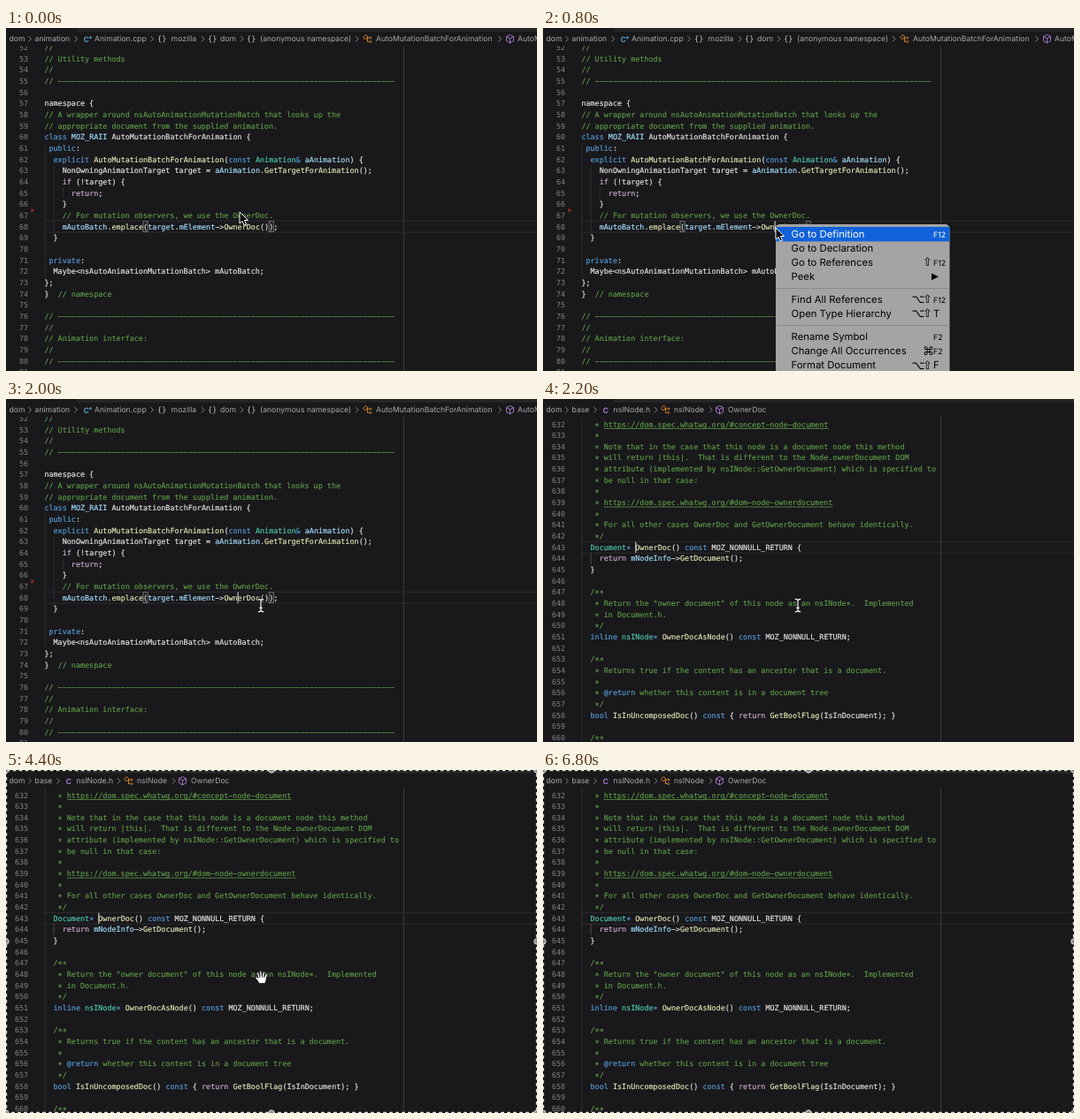
These frames come from a looping animation (600x388 px, 7200 ms). An HTML page:

```html
<!DOCTYPE html>
<html lang="en">
<head>
<meta charset="utf-8">
<title>Go to definition</title>
<style>
  html, body { margin: 0; width: 100%; height: 100%; overflow: hidden; background: #19181b; }
  svg { display: block; width: 600px; height: 388px; }
  text { white-space: pre; text-rendering: geometricPrecision; }
  .code text { font: 8.43px "DejaVu Sans Mono", monospace; stroke-width: .16px; }
  .crumbs text { font: 8.65px Inter, sans-serif; fill: #a9a9a9; }
  .crumbs .brace { font: 8.6px "DejaVu Sans Mono", monospace; fill: #c4c4c4; }
  .menu text { font: 11.3px Inter, sans-serif; }
  .menu .symbol { font: 13px "DejaVu Sans", sans-serif; }
  .menu .fkey { font-size: 8.8px; }
</style>
</head>
<body>
<svg id="stage" viewBox="0 0 600 388">
  <defs><clipPath id="editor"><rect y="20.5" width="600" height="368"/></clipPath></defs>
  <rect width="600" height="388" fill="#19181b"/>
  <rect x="80" width="520" height="4" fill="#252526"/>
</svg>
<script>
const LOOP = 7200, STEP = 200;
const CHAR = 5.075, ROW = 12.66, LEFT = 43.4;
const COLORS = {
  c: '#5c9a46', u: '#5c9a46', k: '#569cd6', t: '#4ec9b0',
  f: '#e6e6b4', v: '#a4e0ff', r: '#cfaed2', p: '#e6e6e6'
};
const stage = document.getElementById('stage');

function add(parent, tag, attrs = {}, content) {
  const node = document.createElementNS('http://www.w3.org/2000/svg', tag);
  for (const key in attrs) node.setAttribute(key, attrs[key]);
  if (content !== undefined) node.textContent = content;
  return parent.appendChild(node);
}
const group = (parent, attrs) => add(parent, 'g', attrs);
const path = (parent, d, attrs) => add(parent, 'path', { d, fill: 'none', ...attrs });
const show = (node, on) => { node.style.display = on ? '' : 'none'; };

// Marked runs look like ~kclass~, the first letter choosing the colour.
const rule = '// ' + '-'.repeat(75);
const animationCode = [
  '//', '// Utility methods', '//', rule, '',
  'namespace {',
  '// A wrapper around nsAutoAnimationMutationBatch that looks up the',
  '// appropriate document from the supplied animation.',
  '~kclass~ ~vMOZ_RAII~ AutoMutationBatchForAnimation {',
  ' ~kpublic~:',
  '  ~kexplicit~ ~fAutoMutationBatchForAnimation~(~kconst~ ~tAnimation~~k&~ ~vaAnimation~) {',
  '    NonOwningAnimationTarget target = ~vaAnimation~.~fGetTargetForAnimation~();',
  '    ~rif~ (!target) {',
  '      ~rreturn~;',
  '    }',
  '    // For mutation observers, we use the OwnerDoc.',
  '    ~vmAutoBatch~.~femplace~(~vtarget~.~vmElement~->~fOwnerDoc~());',
  '  }', '',
  ' ~kprivate~:',
  '  Maybe<nsAutoAnimationMutationBatch> mAutoBatch;',
  '};',
  '}  ~c// namespace~', '',
  rule, '//', '// Animation interface:', '//', rule, ''
];
const nodeCode = [
  '   * ~uhttps://dom.spec.whatwg.org/#concept-node-document~',
  '   *',
  '   * Note that in the case that this node is a document node this method',
  '   * will return |this|.  That is different to the Node.ownerDocument DOM',
  '   * attribute (implemented by nsINode::GetOwnerDocument) which is specified to',
  '   * be null in that case:',
  '   *',
  '   * ~uhttps://dom.spec.whatwg.org/#dom-node-ownerdocument~',
  '   *',
  '   * For all other cases OwnerDoc and GetOwnerDocument behave identically.',
  '   */',
  '  ~tDocument~~k*~ ~fOwnerDoc~() ~kconst~ MOZ_NONNULL_RETURN {',
  '    ~rreturn~ ~vmNodeInfo~->~fGetDocument~();',
  '  }', '',
  '  /**',
  '   * Return the "owner document" of this node as an nsINode*.  Implemented',
  '   * in Document.h.',
  '   */',
  '  ~kinline~ ~tnsINode~~k*~ ~fOwnerDocAsNode~() ~kconst~ MOZ_NONNULL_RETURN;', '',
  '  /**',
  '   * Returns true if the content has an ancestor that is a document.',
  '   *',
  '   * ~k@return~ whether this content is in a document tree',
  '   */',
  '  ~kbool~ ~fIsInUncomposedDoc~() ~kconst~ { ~rreturn~ ~fGetBoolFlag~(IsInDocument); }', '',
  '  /**'
];

// The editor face has centred asterisks and wide hyphens.
const editorGlyphs = s => s.replaceAll('*', '\u2217').replaceAll('-', '\u2212');

function drawLine(parent, line, y) {
  const base = /^\s*(\/\/|\/?\*)/.test(line) ? 'c' : 'p';
  let col = 0;
  line.split('~').forEach((part, i) => {
    const kind = i % 2 ? part[0] : base;
    const run = i % 2 ? part.slice(1) : part;
    const x = LEFT + col * CHAR;
    const color = COLORS[kind];
    if (run.trim()) add(parent, 'text', { x, y: y + 3, fill: color, stroke: color }, editorGlyphs(run));
    if (kind === 'u') {
      path(parent, `M${x} ${y + 5}h${run.length * CHAR}`, { stroke: color, 'stroke-width': .8 });
    }
    col += run.length;
  });
}

function drawPage(lines, first, top, active) {
  const page = group(stage);
  const code = group(page, { class: 'code', 'clip-path': 'url(#editor)' });
  const rowY = n => top + (n - first) * ROW;
  path(code, 'M449.5 20V388', { stroke: '#3b3b3c' });
  for (const dy of [-6.4, 6.4]) {
    path(code, `M${LEFT} ${rowY(active) + dy}H600`, { stroke: '#2b2b2c' });
  }
  lines.forEach((line, i) => {
    const y = top + i * ROW;
    add(code, 'text', { x: 25.2, y: y + 3, fill: '#808083', 'text-anchor': 'end' }, first + i);
    drawLine(code, line, y);
  });
  const guide = (col, from, to, stroke = '#343436') =>
    path(code, `M${LEFT + col * CHAR + .6} ${rowY(from) - 6.3}V${rowY(to) + 6.3}`, { stroke, 'stroke-width': .8 });
  const caret = col => add(code, 'rect', {
    x: LEFT + col * CHAR - .1, y: rowY(active) - 6.2, width: 1.2, height: 12.4, fill: '#c4c4c0'
  });
  return { page, code, rowY, guide, caret };
}

const icons = {
  brace: (g, x) => add(g, 'text', { x, y: 15.3, class: 'brace' }, '{}'),
  cpp(g, x) {
    add(g, 'text', { x, y: 15.6, style: 'font-weight:700;fill:#519aba' }, 'C');
    path(g, `M${x + 6.2} 10.8h3.4m-1.7 -1.7v3.4`, { stroke: '#519aba' });
  },
  header: (g, x) => add(g, 'text', { x, y: 15.6, style: 'font-weight:700;fill:#a074c4' }, 'C'),
  type: (g, x) => path(g, `M${x} 10.5l3 -3 2.4 2.4 -3 3zM${x + 4} 11.2h3M${x + 5} 11.2v4.3h2M${x + 7} 11.2l1.3 -1.3 1.3 1.3 -1.3 1.3zM${x + 7} 15.5l1.3 -1.3 1.3 1.3 -1.3 1.3z`,
    { stroke: '#e08e2b', 'stroke-width': .9 }),
  method: (g, x) => path(g, `M${x + 4.5} 7.6l4 2.1v4.9l-4 2.3 -4 -2.3v-4.9zM${x + .5} 9.7l4 2.1 4 -2.1M${x + 4.5} 11.8v5`,
    { stroke: '#b180d7', 'stroke-width': .9 })
};

function drawCrumbs(page, items) {
  const g = group(page, { class: 'crumbs' });
  for (const [x, label, icon, iconX, chevron] of items) {
    if (icon) icons[icon](g, iconX);
    add(g, 'text', { x, y: 15.4 }, label);
    if (chevron) path(g, `M${chevron - 1.5} 9.2l3 3.1 -3 3.1`, { stroke: '#8d8d8d', 'stroke-width': .9 });
  }
}

const source = drawPage(animationCode, 52, 22.1, 68);
drawCrumbs(source.page, [
  [3.6, 'dom', '', 0, 27], [32.6, 'animation', '', 0, 79],
  [100, 'Animation.cpp', 'cpp', 87.5, 165], [186.6, 'mozilla', 'brace', 171, 222.5],
  [242, 'dom', 'brace', 228, 266.5], [287, '(anonymous namespace)', 'brace', 272, 396.5],
  [418, 'AutoMutationBatchForAnimation', 'type', 403.5, 558], [578, 'AutoMutationBatch', 'method', 565]
]);
source.guide(0, 61, 72);
source.guide(2, 63, 68);
source.guide(4, 65, 65);
path(source.code, 'M28.5 203.4l3.6 2.8 -3.6 2.8z', { fill: '#8c2f1c' });
for (const col of [22, 50]) {
  add(source.code, 'rect', {
    x: LEFT + col * CHAR, y: source.rowY(68) - 5.9, width: CHAR, height: 11.8,
    fill: 'none', stroke: '#8a8a8a', 'stroke-width': .8
  });
}
const sourceCaret = source.caret(43);

const target = drawPage(nodeCode, 632, 28.5, 643);
drawCrumbs(target.page, [
  [3.6, 'dom', '', 0, 27], [32.6, 'base', '', 0, 59],
  [79.6, 'nsINode.h', 'header', 67.5, 127.5], [148, 'nsINode', 'type', 133.5, 189.5],
  [209, 'OwnerDoc', 'method', 195]
]);
target.guide(0, 631, 661);
target.guide(2, 644, 644, '#5a5a5a');
const targetCaret = target.caret(12);

const menu = group(stage, { class: 'menu' });
add(menu, 'rect', { x: 263, y: 222, width: 196.5, height: 180, rx: 5, fill: '#a4a4a5' });
const highlight = add(menu, 'rect', { x: 263, y: 225, width: 196.5, height: 16.4, fill: '#1162d9' });
const definition = group(menu);
function menuItem(parent, y, label, symbols, key) {
  add(parent, 'text', { x: 280.6, y: y + 4 }, label);
  [...symbols].reverse().forEach((s, i) =>
    add(parent, 'text', { x: 429 - i * 12.5, y: y + 4.4, class: 'symbol' }, s));
  add(parent, 'text', { x: 441, y: y + 4, class: /\d/.test(key) ? 'fkey' : '' }, key);
}
menuItem(definition, 233, 'Go to Definition', '', 'F12');
[
  [249, 'Go to Declaration', '', ''], [265, 'Go to References', '⇧', 'F12'], [281, 'Peek', '', ''],
  [307, 'Find All References', '⌥⇧', 'F12'], [323, 'Open Type Hierarchy', '⌥⇧', 'T'],
  [349.3, 'Rename Symbol', '', 'F2'], [365.4, 'Change All Occurrences', '⌘', 'F2'],
  [381.4, 'Format Document', '⌥⇧', 'F']
].forEach(item => menuItem(menu, ...item));
path(menu, 'M439 277.4l8 3.9 -8 3.9z', { fill: '#000' });
path(menu, 'M263 294.5h196.5M263 336.5h196.5', { stroke: '#8a8a8b', 'stroke-width': 1.2 });

// Capture frame with its handles
const frame = group(stage);
const edge = { x: .6, y: .6, width: 598.8, height: 386.8, fill: 'none', 'stroke-width': 1.2 };
add(frame, 'rect', { ...edge, stroke: '#000' });
add(frame, 'rect', { ...edge, stroke: '#dcdcdc', 'stroke-dasharray': '4 3' });
for (const x of [0, 300, 600]) for (const y of [0, 194, 388]) {
  if (x !== 300 || y !== 194) add(frame, 'circle', { cx: x, cy: y, r: 3.2, fill: '#8b8b8b', stroke: '#e0e0e0' });
}

const arrow = group(stage);
path(arrow, 'M0 0V13.2L3 10.4 5.1 15.2 7.5 14.2 5.4 9.5H9.4Z', { fill: '#000', stroke: '#fff', 'stroke-width': 1 });
const beam = group(stage, { transform: 'translate(288 233.5)' });
for (const [stroke, width] of [['#222', 2.6], ['#f2f2f2', 1.2]]) {
  path(beam, 'M-3.2 -7.2Q0 -7.2 0 -5Q0 -7.2 3.2 -7.2M0 -5V5M-3.2 7.2Q0 7.2 0 5Q0 7.2 3.2 7.2M-1.8 2.8H1.8',
    { stroke, 'stroke-width': width });
}
const hand = group(stage, { transform: 'translate(281 226.4)' });
path(hand, 'M4.8 15C4.2 12.5 1.2 10.2 .8 8.6C.6 7.2 2.2 7 4 9L2.6 3.6C2.4 2 4.2 1.8 4.7 3.4L5.8 6.6 5.7 2C5.8 .4 7.7 .4 7.9 2L8.4 6.4 9.3 2.4C9.8 1 11.5 1.4 11.3 3L10.9 7 12.4 4.4C13.3 3.2 14.8 4 14.2 5.5C13.2 8 13.4 11.5 11.6 15Z',
  { fill: '#fff', stroke: '#111', 'stroke-width': .9 });
path(hand, 'M5.8 6.4V8.4M8.4 6V8.2M10.9 6.6L10.6 8.6', { stroke: '#111', 'stroke-width': .9 });

const pointerPath = [
  [0, 264, 208], [200, 264, 214], [400, 263, 225], [800, 263, 226],
  [1000, 270, 229], [1200, 281, 232], [1400, 289, 233]
];
const between = (t, from, to) => t >= from && t < to;

function pointerAt(t) {
  const next = pointerPath.findIndex(p => p[0] > t);
  if (next < 0) return pointerPath.at(-1).slice(1);
  const [t0, x0, y0] = pointerPath[next - 1], [t1, x1, y1] = pointerPath[next];
  const k = (t - t0) / (t1 - t0);
  return [x0 + (x1 - x0) * k, y0 + (y1 - y0) * k];
}

function render(t) {
  const jumped = t >= 2200;
  show(source.page, !jumped);
  show(target.page, jumped);
  show(sourceCaret, t >= 400);
  show(targetCaret, between(t % 1000, 200, 600));

  const selected = between(t, 400, 1600);
  show(menu, between(t, 400, 1800));
  show(highlight, selected);
  definition.setAttribute('fill', selected ? '#fff' : '#000');

  show(arrow, t < 1800);
  arrow.setAttribute('transform', `translate(${pointerAt(t)})`);
  show(beam, between(t, 1800, 4200));
  show(hand, between(t, 4200, 5800));
  show(frame, t >= 4200);
}

const start = performance.now();
function tick() {
  const t = (performance.now() - start) % LOOP;
  render(Math.floor(t / STEP) * STEP);
  requestAnimationFrame(tick);
}
tick();
</script>
</body>
</html>
```
